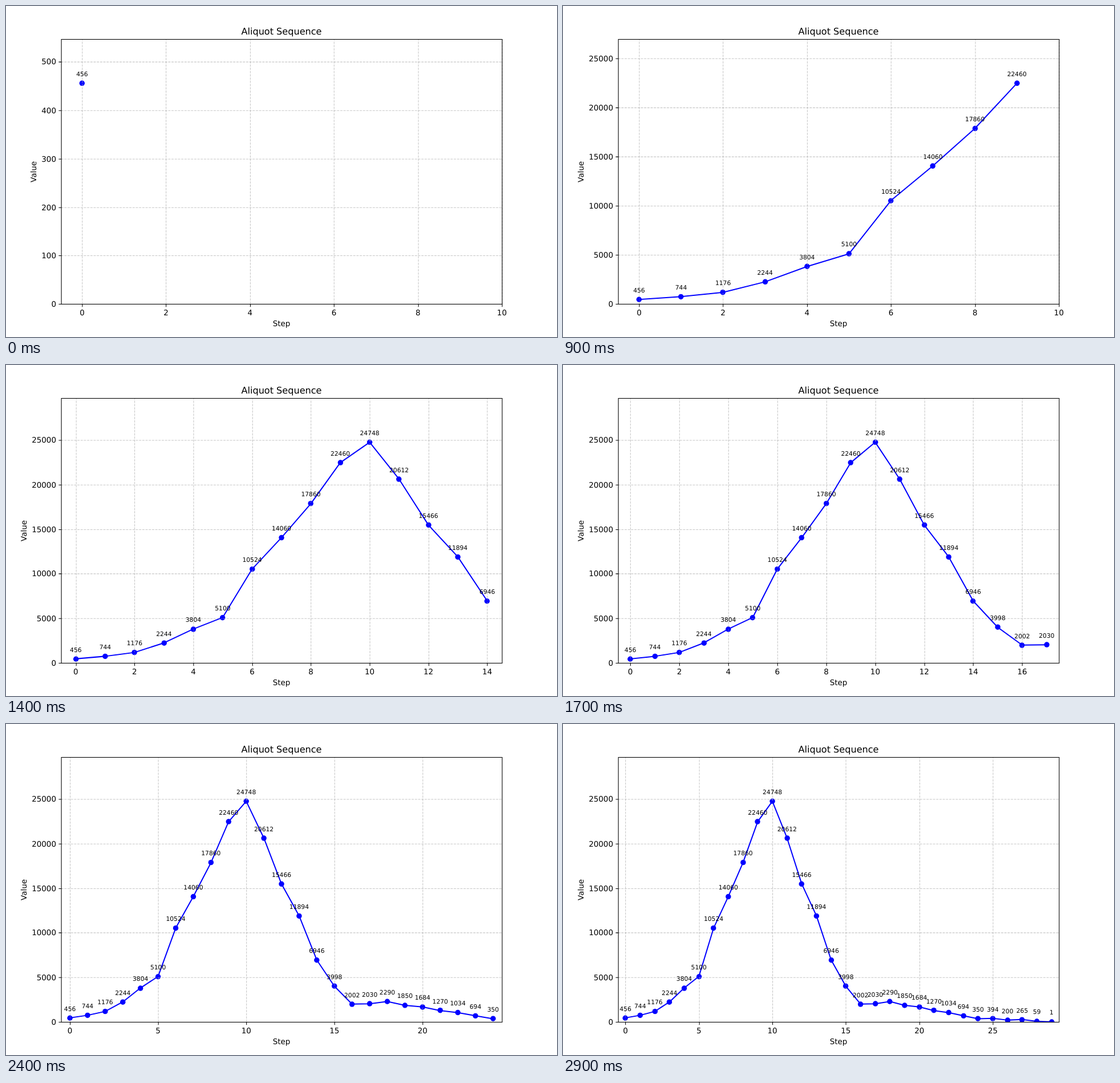
Animation of 966 by 580 pixels, one loop 3 s. Source, as an HTML page:

```html
<!DOCTYPE html>
<html lang="en">
<head>
<meta charset="utf-8">
<title>Aliquot Sequence</title>
<style>
  html, body { margin: 0; width: 100%; height: 100%; overflow: hidden; background: #fff; }
  svg { display: block; width: 966px; height: 580px; }
  text { font-family: "DejaVu Sans", sans-serif; font-size: 13.89px; fill: #000; text-rendering: geometricPrecision; }
  .mid { text-anchor: middle; }
  .end { text-anchor: end; }
  .title { font-size: 16.67px; }
  .note { font-size: 11.11px; }
  .grid { stroke: #b0b0b0; stroke-opacity: .7; stroke-width: 1.11; stroke-dasharray: 4.11 1.78; fill: none; }
  .axis { stroke: #000; stroke-width: 1.11; fill: none; }
  .curve { stroke: #00f; stroke-width: 2.08; stroke-linejoin: round; stroke-linecap: square; fill: none; }
  .dot { fill: #00f; }
</style>
</head>
<body>
<!-- The chart is laid out on 1000 x 600 and scaled down to the stage -->
<svg viewBox="0 0 1000 600" preserveAspectRatio="none" xmlns="http://www.w3.org/2000/svg">
  <defs><clipPath id="area"><rect x="100" y="60" width="800" height="480"/></clipPath></defs>
  <rect width="1000" height="600" fill="#fff"/>
  <g id="dots" clip-path="url(#area)"></g>
  <g id="grid"></g>
  <path id="ticks" class="axis"/>
  <path id="curve" class="curve" clip-path="url(#area)"/>
  <rect class="axis" x="100.5" y="60.5" width="800" height="480"/>
  <g id="labels"></g>
  <g id="notes"></g>
  <text class="mid title" x="500" y="52">Aliquot Sequence</text>
  <text class="mid" x="500" y="580">Step</text>
  <text class="mid" id="ylabel">Value</text>
</svg>
<script>
const LEFT = 100, RIGHT = 900, TOP = 60, BOTTOM = 540;
const STEP_MS = 100, COUNT = 30, DIGIT = 8.84;
const el = id => document.getElementById(id);

// Sum of the proper divisors
function aliquot(n) {
  let sum = 0;
  for (let d = 1; d <= n / 2; d++) if (n % d === 0) sum += d;
  return sum;
}

const values = [456];
while (values.length < COUNT) values.push(aliquot(values[values.length - 1]));

// Smallest round step that gives at most nine intervals
function niceStep(span) {
  const raw = span / 9;
  const scale = 10 ** Math.floor(Math.log10(raw));
  return [1, 2, 2.5, 5, 10].find(s => s * scale >= raw - 1e-9) * scale;
}

function tickList(max, span) {
  const step = niceStep(span), list = [];
  for (let k = 0; k * step <= max + 1e-9; k++) list.push(k * step);
  return { list, text: v => step % 1 ? v.toFixed(1) : String(Math.round(v)) };
}

const snap = v => Math.round(v) + 0.5;
const label = (cls, x, y, text) => `<text class="${cls}" x="${x}" y="${y}">${text}</text>`;
const gridLine = d => `<path class="grid" d="${d}"/>`;

function draw(last) {
  const shown = values.slice(0, last + 1);
  const xMax = Math.max(10, last + 0.5);
  const yMax = Math.max(...shown) * 1.2;
  const px = v => LEFT + (v + 0.5) / (xMax + 0.5) * (RIGHT - LEFT);
  const py = v => BOTTOM - v / yMax * (BOTTOM - TOP);
  const xs = tickList(xMax, xMax + 0.5), ys = tickList(yMax, yMax);
  let grid = "", ticks = "", labels = "", dots = "", notes = "";

  for (const v of xs.list) {
    const x = snap(px(v));
    grid += gridLine(`M${x} ${BOTTOM}V${TOP}`);
    ticks += `M${x} 540.5v4.86`;
    labels += label("mid", px(v), 561, xs.text(v));
  }
  for (const v of ys.list) {
    const y = snap(py(v));
    grid += gridLine(`M${LEFT} ${y}H${RIGHT}`);
    ticks += `M100.5 ${y}h-4.86`;
    labels += label("end", 91, Math.round(py(v) + 5), ys.text(v));
  }
  shown.forEach((v, i) => {
    dots += `<circle class="dot" cx="${Math.round(px(i))}" cy="${Math.round(py(v))}" r="4.9"/>`;
    notes += label("mid note", px(i), Math.round(py(v) - 13.89) + 1, v);
  });

  el("grid").innerHTML = grid;
  el("labels").innerHTML = labels;
  el("dots").innerHTML = dots;
  el("notes").innerHTML = notes;
  el("ticks").setAttribute("d", ticks);
  el("curve").setAttribute("d", last ? "M" + shown.map((v, i) => `${px(i)} ${py(v)}`).join("L") : "");

  const digits = ys.text(ys.list[ys.list.length - 1]).length;
  const x = Math.round(54.7 - (digits - 3) * DIGIT);
  el("ylabel").setAttribute("transform", `translate(${x} 300.5) rotate(-90)`);
}

let current = -1;
const start = performance.now();
function tick(now) {
  const last = Math.floor(Math.max(0, now - start) / STEP_MS) % COUNT;
  if (last !== current) draw(current = last);
  requestAnimationFrame(tick);
}
tick(start);
</script>
</body>
</html>
```
